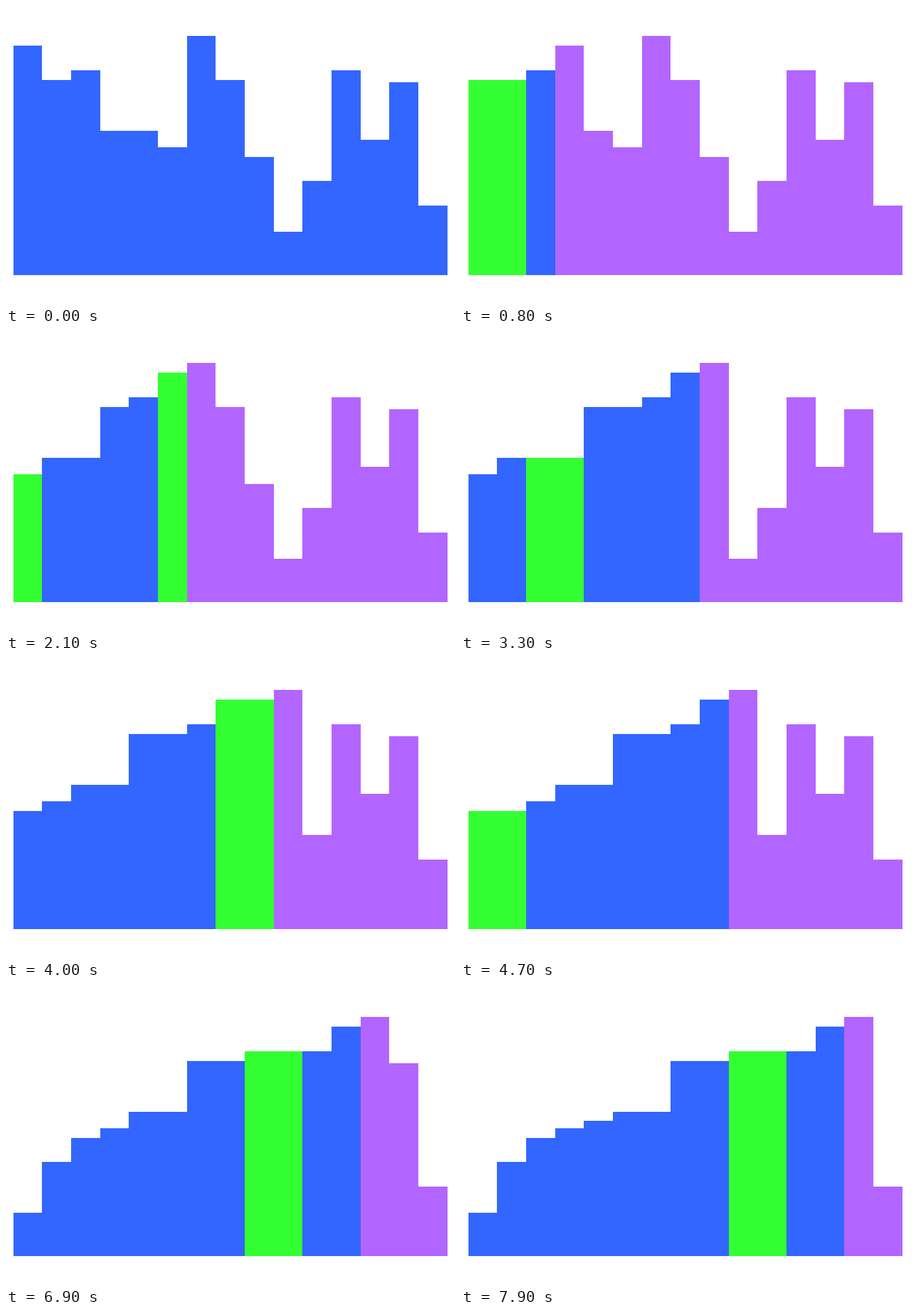
Recreate the animation shown at these times as an HTML page with a canvas. Size 600x400 px, loop 8000 ms.

```html
<!DOCTYPE html>
<html lang="en">
<head>
<meta charset="utf-8">
<title>Insertion sort</title>
<style>
  html, body { margin: 0; width: 100%; height: 100%; overflow: hidden; background: #fff; }
  canvas { display: block; }
</style>
</head>
<body>
<canvas id="stage" width="600" height="400"></canvas>
<script>
const ctx = document.getElementById('stage').getContext('2d');
const SORTED = '#3366ff', WAITING = '#b266ff', ACTIVE = '#33ff33';
const STEP = 100, COUNT = 80, LEFT = 10, WIDTH = 580, BASE = 360;
const heights = [307, 261, 274, 193, 193, 171, 320, 261, 158, 58, 126, 274, 181, 258, 93];

// Record every state of the insertion sort.
function sortSteps(source) {
  const bars = source.slice();
  const steps = [];
  const record = (bound, ...active) => steps.push({ bars: bars.slice(), bound, active });

  record(bars.length);
  for (let i = 1; i < bars.length; i++) {
    const key = bars[i];
    let j = i - 1;
    if (i > 7) record(i, j, i);
    while (j >= 0 && bars[j] > key) {
      bars[j + 1] = bars[j];
      record(i, j, j + 1);
      j--;
    }
    if (j < 0) record(i, 0);
    bars[j + 1] = key;
    record(i, j + 1, i);
  }
  return steps.slice(0, COUNT);
}

const steps = sortSteps(heights);
const edge = i => Math.floor(LEFT + i * WIDTH / heights.length);

function draw({ bars, bound, active }) {
  ctx.fillStyle = '#fff';
  ctx.fillRect(0, 0, 600, 400);
  bars.forEach((h, i) => {
    ctx.fillStyle = active.includes(i) ? ACTIVE : i < bound ? SORTED : WAITING;
    ctx.fillRect(edge(i), BASE - h, edge(i + 1) - edge(i), h);
  });
}

let start;
function tick(now) {
  start ??= now;
  draw(steps[Math.floor(Math.max(0, now - start) / STEP) % COUNT]);
  requestAnimationFrame(tick);
}
draw(steps[0]);
requestAnimationFrame(tick);
</script>
</body>
</html>
```
